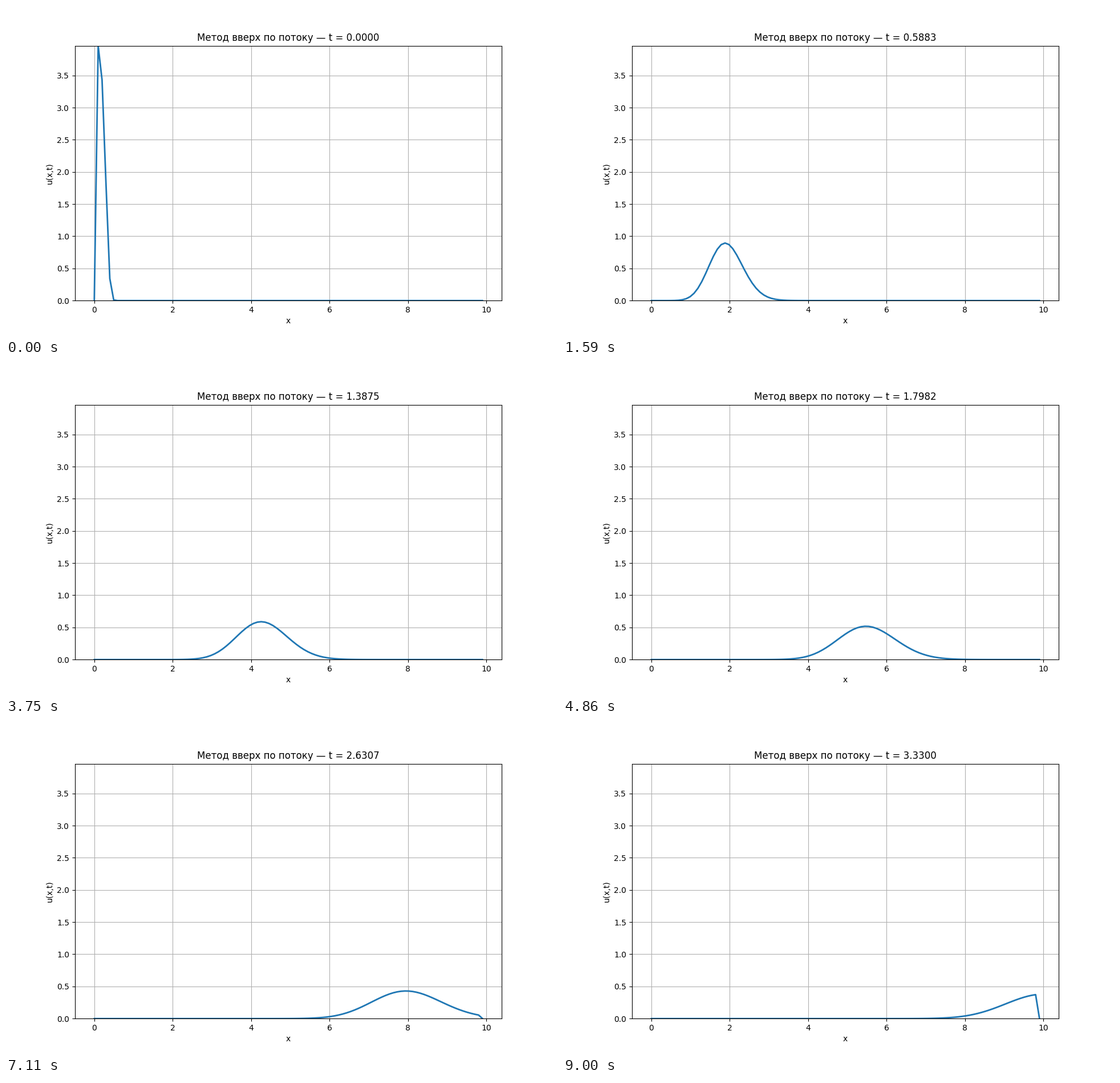
A matplotlib script for the animation above (9.03 s loop, 966 by 580 pixels).

```python
import numpy as np
import matplotlib.pyplot as plt
from matplotlib.animation import FuncAnimation

FRAMES = 301
FRAME_DT = 0.0111   # simulated time between frames
SUBSTEPS = 100
SPEED = 3.0
DX = 0.1


def solve():
    """Upwind advection of a quartic-exponential pulse, zero at both ends."""
    x = np.linspace(0, 9.9, 101)
    u = 4 * np.exp(-100 * x**4)
    u[0] = u[-1] = 0
    cfl = SPEED * FRAME_DT / SUBSTEPS / DX
    states = [u.copy()]
    for _ in range(FRAMES - 1):
        for _ in range(SUBSTEPS):
            u[1:-1] -= cfl * (u[1:-1] - u[:-2])
        states.append(u.copy())
    return x, np.array(states)


x, states = solve()

fig, ax = plt.subplots(figsize=(9.66, 5.8), dpi=100)
line, = ax.plot(x, states[0], lw=2)
ax.set_xlim(-0.495, 10.395)
ax.set_ylim(0, states.max())
ax.set_xlabel("x")
ax.set_ylabel("u(x,t)")
ax.grid(True)
title = ax.set_title("")


def update(i):
    line.set_ydata(states[i])
    title.set_text(f"Метод вверх по потоку — t = {i * FRAME_DT:.4f}")
    return line, title


anim = FuncAnimation(fig, update, frames=FRAMES, interval=30,
                     repeat=True, repeat_delay=0, blit=False)
plt.show()
```
